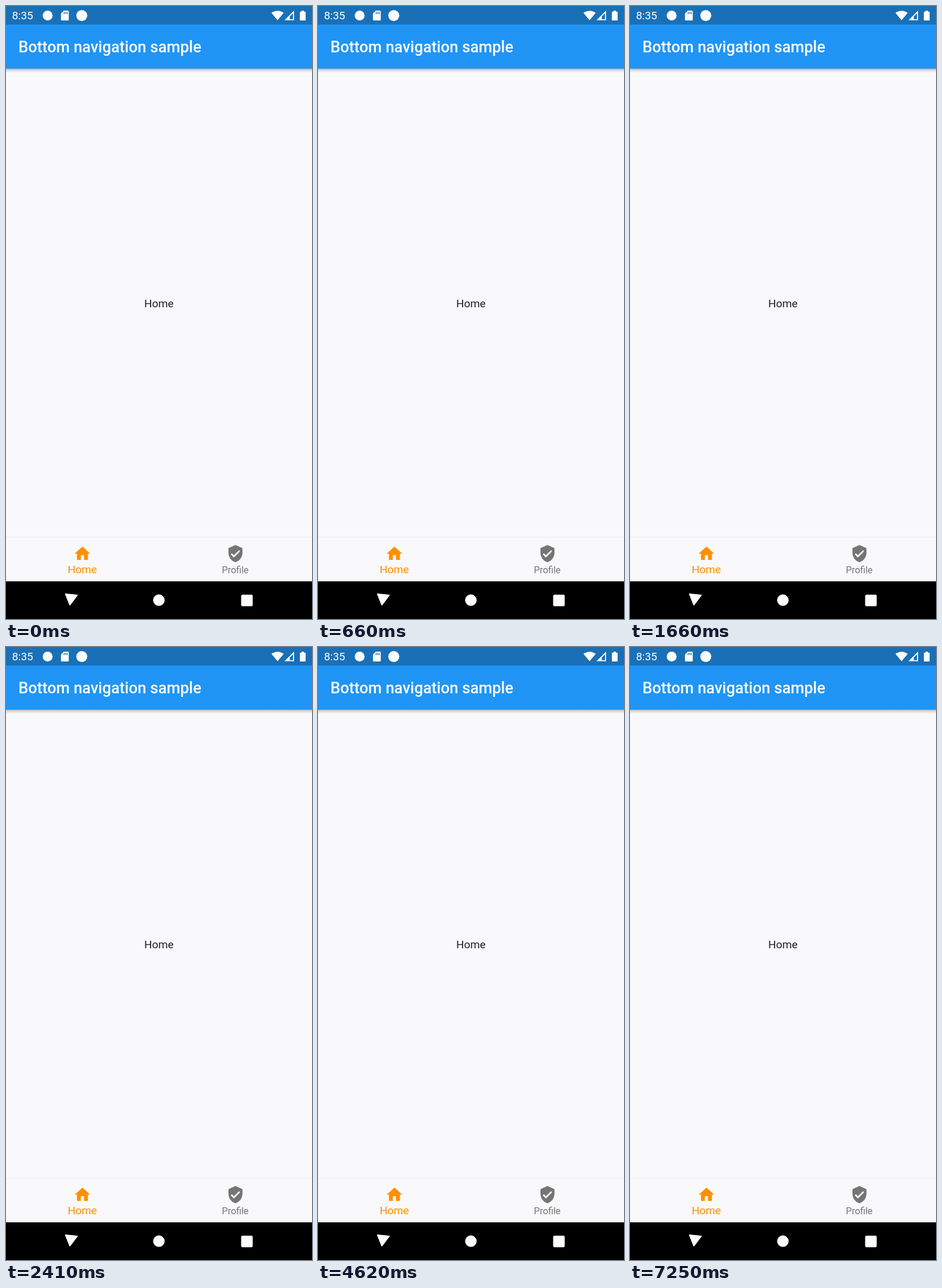
An HTML page for the animation above (7.3 s loop, 529x1058 px).

```html
<!DOCTYPE html>
<html lang="en">
<head>
<meta charset="utf-8">
<title>Bottom navigation sample</title>
<style>
  html, body { margin: 0; height: 100%; overflow: hidden; background: #000; }
  svg { display: block; width: 100vw; height: 100vh; }
  text { font-family: Roboto, sans-serif; font-size: 18.86px; }
  .mid { text-anchor: middle; }
</style>
</head>
<body>
<svg viewBox="0 0 529 1058">
  <defs>
    <linearGradient id="shadow" x2="0" y2="1">
      <stop stop-color="#000" stop-opacity=".36"/>
      <stop offset=".4" stop-color="#000" stop-opacity=".12"/>
      <stop offset="1" stop-color="#000" stop-opacity="0"/>
    </linearGradient>
  </defs>

  <rect width="529" height="993" fill="#f9f9fb"/>
  <rect y="107.5" width="529" height="8" fill="url(#shadow)"/>
  <rect width="529" height="108" fill="#2095f5"/>
  <rect width="529" height="32" fill="#1a70b7"/>

  <g fill="#fff">
    <text x="10.5" y="23">8:35</text>
    <circle cx="72" cy="16.5" r="8.5"/>
    <path d="M100 8h7q1.500 0 1.500 1.500v14q0 1.500-1.500 1.500H96.500q-1.500 0-1.500-1.500V13z"/>
    <path d="M100.500 10v4m2.700-4v4m2.700-4v4" stroke="#1a70b7" stroke-width="1.300"/>
    <circle cx="131" cy="16.500" r="9.500"/>
    <path d="M469.500 24.500L459 12q10.500-7.500 21 0z"/>
    <path d="M498 8v16.500H481.500zM496.200 12.500L490.500 18.200V22.700h5.700z" fill-rule="evenodd"/>
    <path d="M511 8h4v1.700h2q1 0 1 1V24q0 1-1 1h-8q-1 0-1-1V10.700q0-1 1-1h2z"/>
    <text x="21.500" y="80" style="font-size:26.940px;font-weight:500">Bottom navigation sample</text>
  </g>

  <text id="page" class="mid" x="264.300" y="519.700" fill="#1f1f20"></text>

  <rect y="916" width="529" height="1.500" fill="#efeff1"/>
  <g class="tab">
    <path transform="translate(116 929) scale(1.347)" d="M10 20v-6h4v6h5v-8h3L12 3 2 12h3v8z"/>
    <text class="mid">Home</text>
  </g>
  <g class="tab">
    <path transform="translate(380.500 929) scale(1.347)" d="M12 1L3 5v6c0 5.550 3.840 10.740 9 12 5.160-1.260 9-6.450 9-12V5zm-2 16l-4-4 1.410-1.410L10 14.170l6.590-6.590L18 9z"/>
    <text class="mid">Profile</text>
  </g>

  <rect y="993" width="529" height="65"/>
  <g fill="#fff" stroke="#fff" stroke-linejoin="round">
    <path d="M103 1015l20 2-12.500 16.500z" stroke-width="2"/>
    <circle cx="264.300" cy="1025.500" r="9.500"/>
    <rect x="407" y="1016.500" width="19" height="19" rx="1.500"/>
  </g>
</svg>
<script>
const LOOP = 7300, FADE = 200;
const taps = [2740, 4380, 5450, 6220];   // each tap toggles Home / Profile
const GREY = [117, 117, 117], AMBER = [255, 143, 0];
const centers = [132, 396.3];
const tabs = [...document.querySelectorAll('.tab')];
const page = document.getElementById('page');

// Material standard curve: cubic-bezier(.4, 0, .2, 1)
function ease(x) {
  let lo = 0, hi = 1;
  for (let i = 0; i < 20; i++) {
    const u = (lo + hi) / 2, v = 1 - u;
    if (1.2 * v * v * u + 0.6 * v * u * u + u ** 3 < x) lo = u; else hi = u;
  }
  return 3 * (1 - lo) * lo * lo + lo ** 3;
}

function draw(now) {
  const t = now % LOOP;
  const count = taps.filter(tap => tap <= t).length;
  const active = count % 2;
  const progress = count ? ease(Math.min(1, (t - taps[count - 1]) / FADE)) : 1;

  page.textContent = active ? 'Profile' : 'Home';
  tabs.forEach((tab, i) => {
    const k = i === active ? progress : 1 - progress;
    const color = GREY.map((c, j) => c + (AMBER[j] - c) * k);
    tab.setAttribute('fill', `rgb(${color})`);
    tab.lastElementChild.setAttribute('transform',
      `translate(${centers[i]} ${979.3 - 0.6 * k}) scale(${(12 + 2 * k) / 14})`);
  });
  requestAnimationFrame(draw);
}
draw(performance.now());
</script>
</body>
</html>
```
